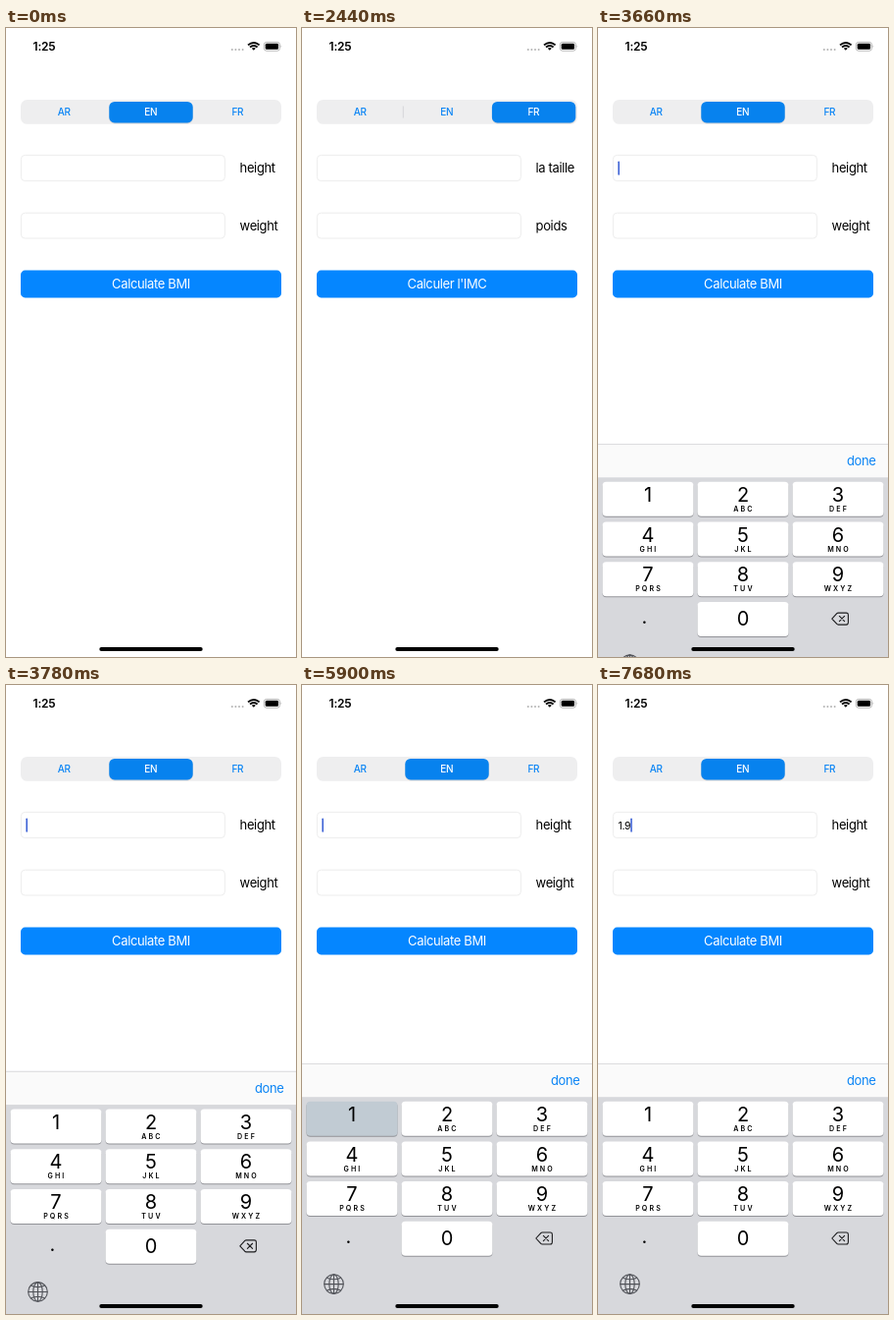
Animation, 296 px wide and 640 px high, one loop 8000 ms. Source, as an HTML page:

```html
<!DOCTYPE html>
<html>
<head>
<meta charset="utf-8">
<style>
  html, body { margin: 0; width: 100%; height: 100%; overflow: hidden; background: #fff; }
  svg { display: block; width: 296px; height: 640px; }
  text { font: 13px Inter, Roboto, sans-serif; letter-spacing: -.37px; }
  .mid { text-anchor: middle; }
  .clock { font-size: 12px; font-weight: 600; letter-spacing: -.2px; }
  .seg { font-size: 10px; letter-spacing: -.25px; font-weight: 500; }
  .typed { font-size: 10.5px; letter-spacing: -.3px; }
  .digit { font-size: 20px; letter-spacing: 0; }
  .letters { font-size: 7.1px; font-weight: 600; letter-spacing: 2.1px; }
  .blue { fill: #0a84f5; }
  .field { fill: #fff; stroke: #e9e9e9; stroke-width: .8; }
</style>
</head>
<body>
<svg viewBox="0 0 296 640">
  <text class="clock" x="27.6" y="23">1:25</text>
  <g fill="#b5b5b5">
    <circle cx="230.8" cy="22" r="1"/><circle cx="234.4" cy="22" r="1"/>
    <circle cx="238" cy="22" r="1"/><circle cx="241.6" cy="22" r="1"/>
  </g>
  <g fill="none" stroke="#000" stroke-width="1.9">
    <path d="M247 17.4Q252.8 12.4 258.6 17.4M249 19.6Q252.8 16.4 256.6 19.6"/>
    <path d="M250.8 20.8Q252.8 19.2 254.8 20.8L252.8 22.8Z" fill="#000" stroke="none"/>
  </g>
  <rect x="263.3" y="14.4" width="16.2" height="8.8" rx="2.6" fill="none" stroke="#a6a6a6" stroke-width=".8"/>
  <rect x="264.7" y="15.8" width="13.4" height="6" rx="1.4"/>
  <path d="M280.6 17.3q1.4 1.5 0 3z" fill="#a6a6a6"/>

  <rect x="15" y="73" width="266" height="24.8" rx="6.5" fill="#eeeeef"/>
  <path id="divider" d="M103.3 79.5V91.5" stroke="#d3d3d6" stroke-width=".9"/>
  <rect id="pillShade" y="76" width="85.4" height="21.4" rx="5.5" fill="#000" opacity=".1"/>
  <rect id="pill" y="75" width="85.4" height="21.4" rx="5.5" fill="#0782ee"/>
  <g id="segs"></g>

  <rect class="field" x="15.4" y="129.4" width="208" height="26.2" rx="4"/>
  <rect class="field" x="15.4" y="188.2" width="208" height="25.8" rx="4"/>
  <text id="height" x="238.6" y="147.4"></text>
  <text id="weight" x="238.6" y="206"></text>
  <text id="typed" class="typed" x="20.5" y="146.6"></text>
  <rect id="caret" y="135.4" width="1.6" height="14.4" rx=".8" fill="#3f63d6"/>
  <rect x="15" y="246.6" width="266" height="27.8" rx="4.5" fill="#0586ff"/>
  <text id="button" class="mid" x="148" y="265.4" fill="#fff"></text>

  <g id="keyboard">
    <rect y="385" width="296" height="300" fill="#d7d8dc"/>
    <rect y="385" width="296" height="34.2" fill="#fafafa"/>
    <path d="M0 385.5H296" stroke="#dcdcde"/>
    <text class="blue" x="254" y="407.2">done</text>
    <g id="keys"></g>
    <text class="digit mid" x="47.5" y="568">.</text>
    <g fill="none" stroke="#1c1c1e" stroke-width="1.1" stroke-linejoin="round" stroke-linecap="round">
      <path d="M238.8 563L243.8 557.6Q244.4 557 245.2 557H253.4Q255.4 557 255.4 559V567Q255.4 569 253.4 569H245.2Q244.4 569 243.8 568.4Z"/>
      <path d="M246.4 560.4l5.2 5.2m0-5.2l-5.2 5.2"/>
    </g>
    <g fill="none" stroke="#505258" stroke-width="1.1">
      <circle cx="32.5" cy="609.6" r="9.8"/><ellipse cx="32.5" cy="609.6" rx="4.7" ry="9.8"/>
      <path d="M32.5 599.8v19.6M22.7 609.6h19.6M25.4 603.2q7.1 3.2 14.2 0M25.4 616q7.1-3.2 14.2 0"/>
    </g>
  </g>
  <rect x="95.3" y="630" width="105.4" height="4" rx="2"/>
</svg>
<script>
const $ = id => document.getElementById(id);
const LOOP = 8000, PRESSED = '#c1cbd3';
const LANGS = {
  en: { seg: 1, height: 'height', weight: 'weight', button: 'Calculate BMI' },
  fr: { seg: 2, height: 'la taille', weight: 'poids', button: "Calculer l'IMC" }
};

// last value whose start time has passed
const at = (t, track) => track.filter(([start]) => t >= start).pop()[1];

$('segs').innerHTML = ['AR', 'EN', 'FR'].map((s, i) =>
  `<text class="seg mid" x="${59.2 + 88.6 * i}" y="89.4">${s}</text>`).join('');
const segs = [...$('segs').children];

const letters = ['', 'ABC', 'DEF', 'GHI', 'JKL', 'MNO', 'PQRS', 'TUV', 'WXYZ'];
function key(digit, col, row) {
  const x = 4.5 + 97 * col, y = 423.7 + 40.7 * row, mid = x + 46.5, sub = letters[digit - 1];
  return `<rect x="${x}" y="${y + 1}" width="93" height="35" rx="4" fill="#929398"/>
    <rect id="key${digit}" x="${x}" y="${y}" width="93" height="35" rx="4"/>
    <text class="digit mid" x="${mid}" y="${y + (digit ? 20.2 : 24.6)}">${digit}</text>
    ${sub ? `<text class="letters mid" x="${mid + 1}" y="${y + 30.2}">${sub}</text>` : ''}`;
}
$('keys').innerHTML = letters.map((_, i) => key(i + 1, i % 3, i / 3 | 0)).join('') + key(0, 1, 3);
for (let d = 0; d < 10; d++) $('key' + d).setAttribute('fill', '#fff');

const language = [[0, 'en'], [1350, 'fr'], [3300, 'en']];
const dimAR = [[0, 1], [1460, .7], [2340, .85], [2440, 1]];
const dimFR = [[0, 1], [500, .85], [610, .7], [1350, 1]];
const typing = [[0, ''], [6050, '1'], [6620, '1.'], [7450, '1.9']];
const blink = [[0, 0], [3550, 1], [4120, 0], [4350, .5], [4470, 1],
  [5010, .5], [5130, 0], [5370, .5], [5490, 1]];
const slideTimes = [0, 3430, 3550, 3660, 3780, 3900, 4000].map(t => [t, t]);

function draw(t) {
  const lang = LANGS[at(t, language)];
  for (const id of ['height', 'weight', 'button']) $(id).textContent = lang[id];

  const pillX = 16.7 + 88.6 * lang.seg;
  $('pill').setAttribute('x', pillX);
  $('pillShade').setAttribute('x', pillX);
  $('divider').setAttribute('opacity', lang.seg === 2 ? 1 : 0);
  segs.forEach((s, i) => s.setAttribute('fill', i === lang.seg ? '#fff' : '#0a84f5'));
  segs[0].setAttribute('opacity', at(t, dimAR));
  segs[2].setAttribute('opacity', at(t, dimFR));

  $('typed').textContent = at(t, typing);
  $('caret').setAttribute('x', 20.4 + $('typed').getComputedTextLength());
  $('caret').setAttribute('opacity', at(t, blink));

  const p = Math.min(1, Math.max(0, (at(t, slideTimes) - 3400) / 553));
  $('keyboard').setAttribute('transform', `translate(0 ${256 * (1 - p) ** 3})`);
  $('key1').setAttribute('fill', t >= 5900 && t < 6050 ? PRESSED : '#fff');
  $('key9').setAttribute('fill', t >= 7340 && t < 7680 ? PRESSED : '#fff');
}

function frame() {
  draw(performance.now() % LOOP);
  requestAnimationFrame(frame);
}
frame();
</script>
</body>
</html>
```
